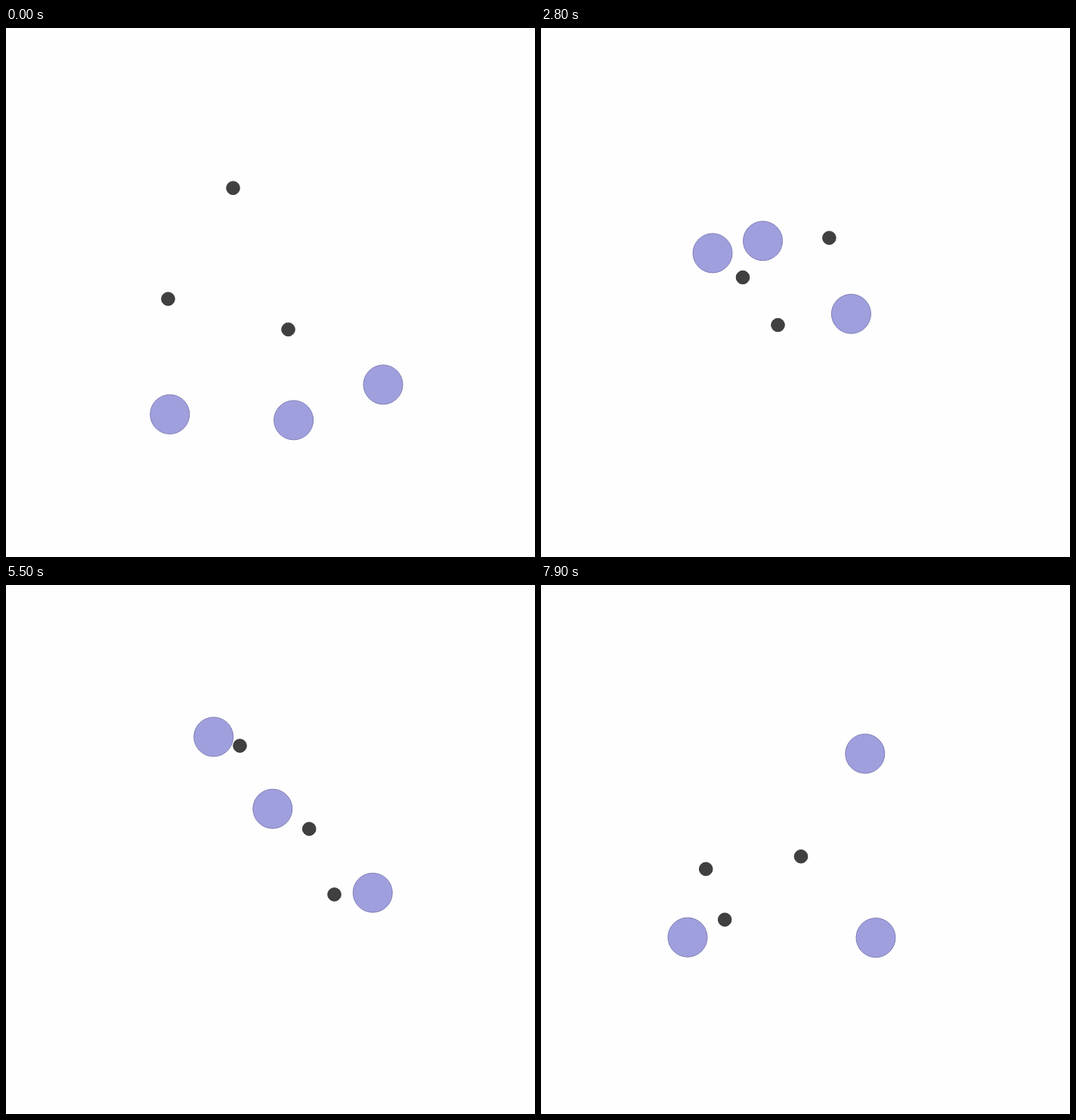
These frames come from a looping animation (700 by 700 pixels, 8000 ms). An HTML page with a canvas:

```html
<!DOCTYPE html>
<html lang="en">
<head>
<meta charset="utf-8">
<title>Agents and landmarks</title>
<style>
html, body { margin: 0; width: 100%; height: 100%; overflow: hidden; background: #fefefe; }
canvas { display: block; width: 700px; height: 700px; }
</style>
</head>
<body>
<canvas id="stage" width="700" height="700"></canvas>
<script>
const ctx = document.getElementById('stage').getContext('2d');
const STEP = 100, STEPS = 80;
const KEEP = 0.75;   // share of the speed kept in each step
const SPRINT = 8;    // legs up to this length are pushed evenly

// Each agent passes its key points at the given steps, then heads for its mark.
const rounds = [
  { steps: [0, 8, 20], agents: [
    { mark: [214.5, 358.5], path: [[216.8, 511.2], [216.8, 325.6], [212.4, 350.4]] },
    { mark: [300.5, 211.7], path: [[380.6, 518.9], [291.4, 422.7], [295.4, 208.5]] },
    { mark: [373.5, 398.9], path: [[499, 471.9], [394, 391.4], [371.6, 407.2]] }
  ] },
  { steps: [22, 36, 47], agents: [
    { mark: [267, 330], path: [[202, 255], [257.3, 349.6], [246, 337.2]] },
    { mark: [313.5, 393], path: [[270, 205], [322, 374.2], [318, 386.7]] },
    { mark: [381.4, 277.7], path: [[433, 458], [383.2, 282.2], [385.8, 284.6]] }
  ] },
  { steps: [48, 63], agents: [
    { mark: [309.5, 212.7], path: [[240, 175], [307.8, 225.7]] },
    { mark: [434.5, 409.5], path: [[520, 415], [452, 399.7]] },
    { mark: [401.2, 322.7], path: [[340, 285], [365, 306.8]] }
  ] },
  { steps: [74, 79], agents: [
    { mark: [243.2, 442.8], path: [[186, 381], [194, 466.2]] },
    { mark: [344, 359.2], path: [[524, 223.2], [428.8, 223.2]] },
    { mark: [218.2, 375.8], path: [[500, 445], [443, 466.7]] }
  ] }
];

// Damped motion along one axis; on long legs the push fades out.
function glide(pos, vel, push, n) {
  const out = [];
  for (let k = 0; k < n; k++) {
    vel = vel * KEEP + push * (n > SPRINT ? 1 - k / n : 1);
    pos += vel;
    out.push(pos);
  }
  return { out, pos, vel };
}

function travel(goals, steps) {
  let pos = goals[0], vel = 0;
  const out = [pos];
  for (let i = 1; i < goals.length; i++) {
    const n = steps[i] - steps[i - 1];
    if (n < 1) break;
    const push = (goals[i] - glide(pos, vel, 0, n).pos) / glide(0, 0, 1, n).pos;
    const leg = glide(pos, vel, push, n);
    out.push(...leg.out);
    ({ pos, vel } = leg);
  }
  return out;
}

rounds.forEach(({ steps, agents }, i) => {
  const next = rounds[i + 1];
  const times = [...steps, (next ? next.steps[0] : STEPS) - 1];
  for (const agent of agents) {
    const goals = [...agent.path, agent.mark];
    [agent.xs, agent.ys] = [0, 1].map(axis => travel(goals.map(p => p[axis]), times));
  }
});

function disc(x, y, r, fill, line) {
  ctx.beginPath();
  ctx.arc(x, y, r, 0, Math.PI * 2);
  ctx.fillStyle = fill;
  ctx.fill();
  ctx.strokeStyle = line;
  ctx.stroke();
}

function draw(step) {
  ctx.fillStyle = '#fefefe';
  ctx.fillRect(0, 0, 700, 700);
  const { steps, agents } = rounds.filter(r => r.steps[0] <= step).pop();
  const k = step - steps[0];
  for (const { xs, ys } of agents) disc(xs[k], ys[k], 26, '#a09fde', '#7f7eb6');
  for (const { mark } of agents) disc(...mark, 8.8, '#404040', '#383838');
}

const begin = performance.now();
function tick() {
  draw(Math.floor((performance.now() - begin) / STEP) % STEPS);
  requestAnimationFrame(tick);
}
tick();
</script>
</body>
</html>
```
